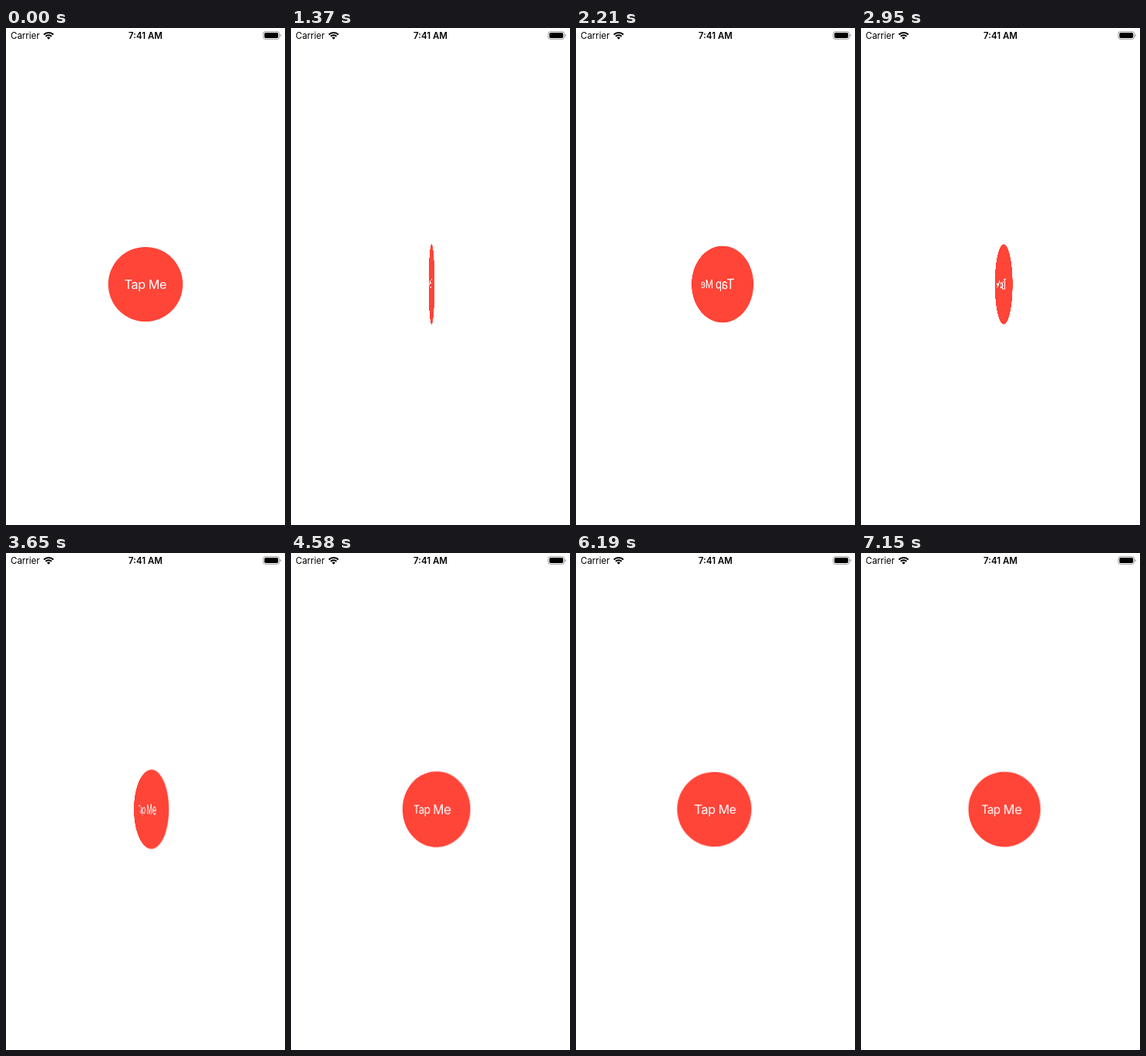
An HTML page that plays this animation: 360 px wide and 640 px high, repeating every 7220 ms.

```html
<!DOCTYPE html>
<html lang="en">
<head>
<meta charset="utf-8">
<title>Spinning button</title>
<style>
  html, body { margin: 0; width: 100%; height: 100%; overflow: hidden; background: #fff; }
  #stage { position: absolute; left: 0; top: 0; width: 360px; height: 640px; overflow: hidden; }
  svg { display: block; }
  text { font-family: Inter, "Liberation Sans", sans-serif; }
  #button { position: absolute; left: 125px; top: 275px; width: 110px; height: 110px; }
</style>
</head>
<body>
<div id="stage">
  <svg width="360" height="640" viewBox="0 0 360 640">
    <text x="6" y="14" font-size="11.5">Carrier</text>
    <g id="wifi" fill="none" stroke="#000"></g>
    <text x="180" y="14" font-size="11.5" font-weight="600" text-anchor="middle">7:41 AM</text>
    <rect x="331.9" y="4.6" width="20.8" height="9.8" rx="2.9" fill="none" stroke="#000" stroke-opacity=".4" stroke-width=".95"/>
    <rect x="333.4" y="6.1" width="17.8" height="6.8" rx="1.6"/>
    <path d="M353.7 7.9Q355 8.4 355 9.5T353.7 11.1Z" fill-opacity=".45"/>
  </svg>
  <div id="button">
    <svg width="110" height="110" viewBox="-55 -55 110 110">
      <circle r="48.1" fill="#ff4438"/>
      <text id="label" x="-.2" y="5.6" font-size="16.2" letter-spacing="-.45" text-anchor="middle" fill="#fff">Tap Me</text>
    </svg>
  </div>
</div>
<script>
const LOOP = 7220;
const DEPTH = 130;             // perspective distance in px
const TAP = 1012.5, RATE = 0.981;
const STIFFNESS = 5, DAMPING = 1;

const button = document.getElementById('button');
const label = document.getElementById('label');

// Wi-Fi fan: two arcs and a wedge around one centre
function arc(r, width) {
  const a = 44.5 * Math.PI / 180, dx = r * Math.sin(a), y = 14.7 - r * Math.cos(a);
  return `<path d="M${55 - dx} ${y}A${r} ${r} 0 0 1 ${55 + dx} ${y}" stroke-width="${width}"/>`;
}
document.getElementById('wifi').innerHTML = arc(8.75, 2) + arc(5.45, 2) + arc(1.55, 3.1);

// Moments at which the picture steps: first, last, count
const runs = [
  [1130, 1370, 3], [1470, 1800, 4], [1900, 2210, 4], [2310, 2430, 2],
  [2650, 3350, 8], [3450, 4160, 8], [4280, 4990, 8], [5110, 5330, 3],
  [5430, 5740, 4], [5860, 6500, 7], [6620, 6850, 3], [7050, 7150, 2]
];
const ticks = [0, 900].concat(...runs.map(([first, last, n]) =>
  Array.from({ length: n }, (_, i) =>
    Math.round((first + (last - first) * i / (n - 1)) / 10) * 10)));

// Underdamped spring going from 0 to 1
function spring(s) {
  if (s <= 0) return 0;
  const decay = DAMPING / 2, w = Math.sqrt(STIFFNESS - decay * decay);
  return 1 - Math.exp(-decay * s) * (Math.cos(w * s) + decay / w * Math.sin(w * s));
}

function labelOpacity(t) {
  if (t < 900) return 1;
  return t < TAP ? 0.25 : Math.min(1, 0.25 + (t - TAP) / 450);
}

function draw(time) {
  const t = time % LOOP;
  const tick = ticks.filter(v => v <= t).pop();
  const angle = 360 * spring((tick - TAP) / 1000 * RATE);
  button.style.transform = angle ? `perspective(${DEPTH}px) rotateY(${angle}deg)` : 'none';
  label.setAttribute('opacity', labelOpacity(tick));
}

function loop() {
  draw(performance.now());
  requestAnimationFrame(loop);
}
loop();
</script>
</body>
</html>
```
